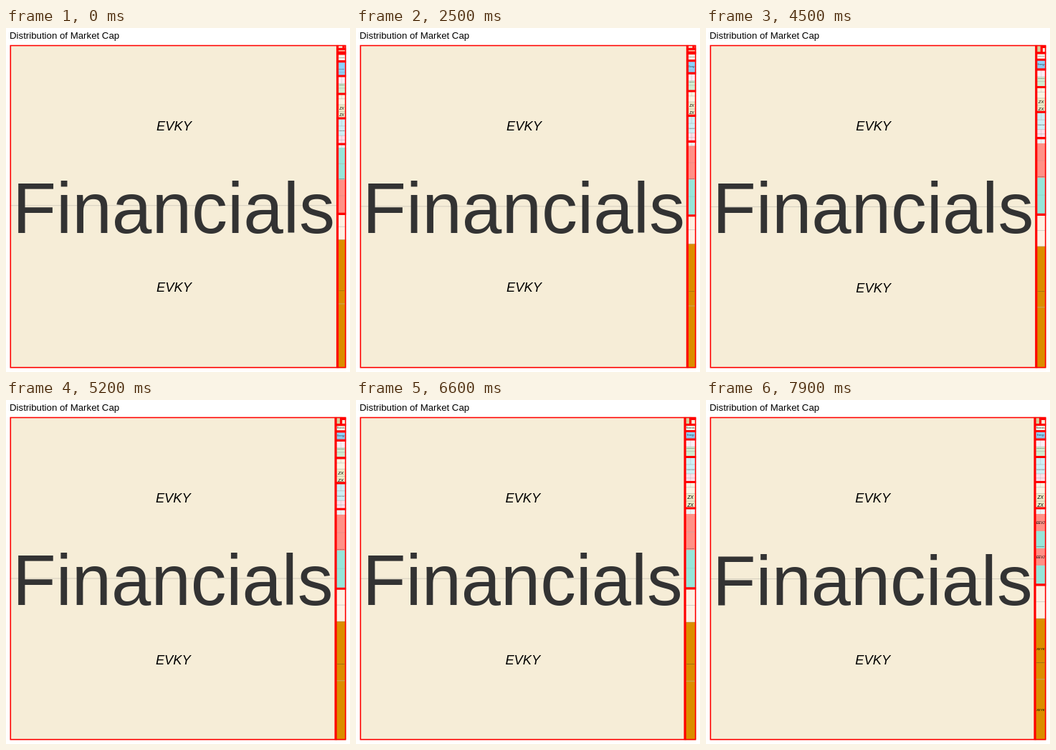
An HTML page with a canvas for the animation above (8 s loop, 480 by 480 pixels).

```html
<!DOCTYPE html>
<html lang="en">
<head>
<meta charset="utf-8">
<title>Distribution of Market Cap</title>
<style>
html, body { margin: 0; width: 100%; height: 100%; overflow: hidden; background: #fff; }
canvas { display: block; width: 480px; height: 480px; }
</style>
</head>
<body>
<canvas id="stage"></canvas>
<script>
const LOOP = 8000, STEP = 100;
const L = 5.5, T = 23.7, R = 474.5, B = 474.5;
const SANS = '"Liberation Sans", Arial, sans-serif';
const cv = document.getElementById('stage');
const ratio = window.devicePixelRatio || 1;
cv.width = cv.height = 480 * ratio;
const g = cv.getContext('2d');
g.scale(ratio, ratio);

const mix = (a, b, p) => a + (b - a) * p;

function smooth(t, from, to) {
  const p = Math.min(1, Math.max(0, (t - from) / (to - from)));
  return p * p * (3 - 2 * p);
}

// Seeded day-to-day flutter in -1..1.
function flutter(t, seed) {
  const v = Math.sin(t / STEP * 12.9898 + seed * 78.233) * 43758.5453;
  return (v - Math.floor(v)) * 2 - 1;
}

// The strip slowly widens while its upper sectors shrink;
// the boundary above the lowest sector swings up and down.
function layout(t) {
  const s = smooth(t, 0, 6600);
  const swing = Math.cos((t - 1500) / 4400 * 2 * Math.PI);
  const techEnd = 261.5 + 3.5 * swing + .5 * flutter(t, 1);
  const staplesEnd = mix(162, 151, s);
  const techStart = staplesEnd + mix(5, 8, s);
  const peachEnd = techEnd + mix(36, 47, s);
  return {
    x: mix(462.5, 459, smooth(t, 2000, 7000)),
    split: mix(248.2, 249.2, s) + .5 * flutter(t, 2),
    edges: [mix(36, 34.5, s), mix(46.7, 43.5, s), mix(67, 55, s), mix(92, 79.5, s),
            mix(126, 114.5, s), staplesEnd, techEnd],
    techStart,
    techMid: (techStart + techEnd) / 2 - 1.5,
    peachEnd
  };
}

function box(x, y0, y1, color, x1 = R) {
  g.fillStyle = color;
  g.fillRect(x, y0, x1 - x, y1 - y0);
}

function line(x0, y0, x1, y1, color, width) {
  g.strokeStyle = color;
  g.lineWidth = width;
  g.beginPath();
  g.moveTo(x0, y0);
  g.lineTo(x1, y1);
  g.stroke();
}

const thin = (x0, y, x1 = R) => line(x0, y, x1, y, 'rgba(140,140,140,.55)', .6);
const thinV = (x, y0, y1) => line(x, y0, x, y1, 'rgba(140,140,140,.4)', .5);
const red = (x0, y0, x1, y1) => line(x0, y0, x1, y1, '#f00', 3.2);

function text(s, x, y, size, color = '#000', style = '', align = 'center') {
  g.font = `${style} ${size}px ${SANS}`;
  g.textAlign = align;
  g.fillStyle = color;
  g.fillText(s, x, y);
}

const ticker = (s, x, mid, size) => text(s, x, mid + size * .36, size, '#000', 'italic');

// Sector name, sized to the strip.
function label(s, x, mid) {
  g.font = `10px ${SANS}`;
  const size = Math.min(3.2, 10 * (R - x - 4) / g.measureText(s).width);
  text(s, (x + R) / 2, mid + size * .36, size, '#333');
}

function corner(x, y, t) {
  box(x, T, y, '#f5f1dc');
  if (t < 3500) {
    box(x, 30, y, '#f4c9a8');
    red(x, 29.3, R, 29.3);
    red(x, 34, R, 34);
    red(471, T, 471, 29);
  } else {
    const v = x + 7.5;
    box(x, T, y, '#d5cf9c', v);
    red(v, T, v, y);
    red(v, 26.3, R, 26.3);
  }
}

function industrials(x, a, b) {
  const mid = mix(a, b, .42);
  box(x, a, mid, '#f9edf5');
  box(x, mid, b, '#cfeed1');
  thin(x, mid);
  thin(x, mix(a, b, .68));
  thinV((x + R) / 2, a, mid);
  label('Industrials', x, (a + b) / 2);
}

function staples(x, a, b, single) {
  const cx = (x + R) / 2;
  box(x, a, b, '#cceff6');
  box(x, mix(a, b, .67), b, '#fcdfea');
  for (const p of [.3, .48, .67, .84]) thin(x, mix(a, b, p));
  thinV(cx, a, mix(a, b, .3));
  thinV(cx, mix(a, b, .67), b);
  label('Consumer Staples', x, (a + b) / 2);
  if (single) ticker('QJ', cx, a + 5, 5);
}

function media(x, a, b, single) {
  const cx = (x + R) / 2, size = (R - x) * .43;
  box(x, a, b, '#f9f5e3');
  box(x, mix(a, b, .44), b, '#ecebc8');
  thin(x, mix(a, b, .2));
  thin(x, mix(a, b, .44));
  thinV(cx, a, mix(a, b, .2));
  if (!single) thin(x, mix(a, b, .73));
  for (const p of single ? [.72] : [.59, .87]) ticker('ZX', cx, mix(a, b, p), size);
}

// Two equal blocks, later dealt out as four alternating ones.
function tech(x, a, start, b, t) {
  const salmon = '#ff9187', teal = '#96e6da', dealt = t >= 7200;
  const colors = t < 1900 ? [teal, salmon] : [salmon, teal];
  const h = (b - 3 - start) / 4;
  box(x, a, start, '#edf6f8');
  thinV((x + R) / 2, a, start);
  box(x, start, b, colors[1]);
  for (let i = 0; i < 4; i++) {
    const y = start + i * h;
    box(x, y, y + h, colors[dealt ? i % 2 : i >> 1]);
    if (dealt && i % 2 === 0) ticker('EEVJ', (x + R) / 2, y + h / 2, 4.6);
    if (!dealt && i % 2) line(x, y, R, y, 'rgba(120,120,120,.25)', .5);
  }
  label('Technology', x, (a + b) / 2);
}

function retail(x, a, peach, t, single) {
  const mid = (peach + B) / 2;
  box(x, a, peach, '#fdf0e2');
  box(x, peach, B, '#db8e00');
  thin(x, peach);
  if (!single) {
    thin(x, (a + peach) / 2);
    line(x, mid, R, mid, 'rgba(190,180,150,.8)', .8);
  }
  label('Consumer Discretionary', x, (a + B) / 2);
  if (t >= 7200) {
    for (const p of [.25, .75]) ticker('XEYK', (x + R) / 2, mix(peach, B, p), 4.4);
  }
}

function financials(x, split, single) {
  const cx = (L + x) / 2 + .5;
  box(L, T, B, '#f6edd7', x);
  if (!single) thin(L, split, x);
  const mids = single ? [(T + B) / 2] : [(T + split) / 2, (split + B) / 2];
  for (const y of mids) ticker('EVKY', cx, y + .2, 18.3);
}

function draw(t) {
  const { x, split, edges, techStart, techMid, peachEnd } = layout(t);
  const [y1, y2, y3, y4, y5, y6, y7] = edges;
  const single = t >= 1300 && t < 1600;

  g.fillStyle = '#fff';
  g.fillRect(0, 0, 480, 480);
  text('Distribution of Market Cap', 5, 15, 13.25, '#000', '', 'left');

  g.save();
  g.beginPath();
  g.rect(L, T, R - L, B - T);
  g.clip();

  financials(x, split, single);
  corner(x, y1, t);
  box(x, y1, y2, '#f8faec');
  label('Materials', x, (y1 + y2) / 2);
  box(x, y2, y3, '#8ad2ff');
  thin(x, mix(y2, y3, .75));
  label('Energy', x, (y2 + y3) / 2);
  industrials(x, y3, y4);

  const order = t < 6200 ? [media, staples] : [staples, media];
  order[0](x, y4, y5, single);
  order[1](x, y5, y6, single);

  tech(x, y6, techStart, y7, t);
  retail(x, y7, peachEnd, t, single);

  for (const y of edges) red(x, y, R, y);
  red(x, T, x, B);
  g.strokeStyle = '#f00';
  g.lineWidth = 3.2;
  g.strokeRect(L, T, R - L, B - T);
  g.restore();

  text('Financials', (L + x) / 2, 285.5, (x - L) * .2187, '#333');
}

let last = -1;
function tick(now) {
  const t = Math.floor(now % LOOP / STEP) * STEP;
  if (t !== last) draw(last = t);
  requestAnimationFrame(tick);
}
draw(0);
requestAnimationFrame(tick);
</script>
</body>
</html>
```
